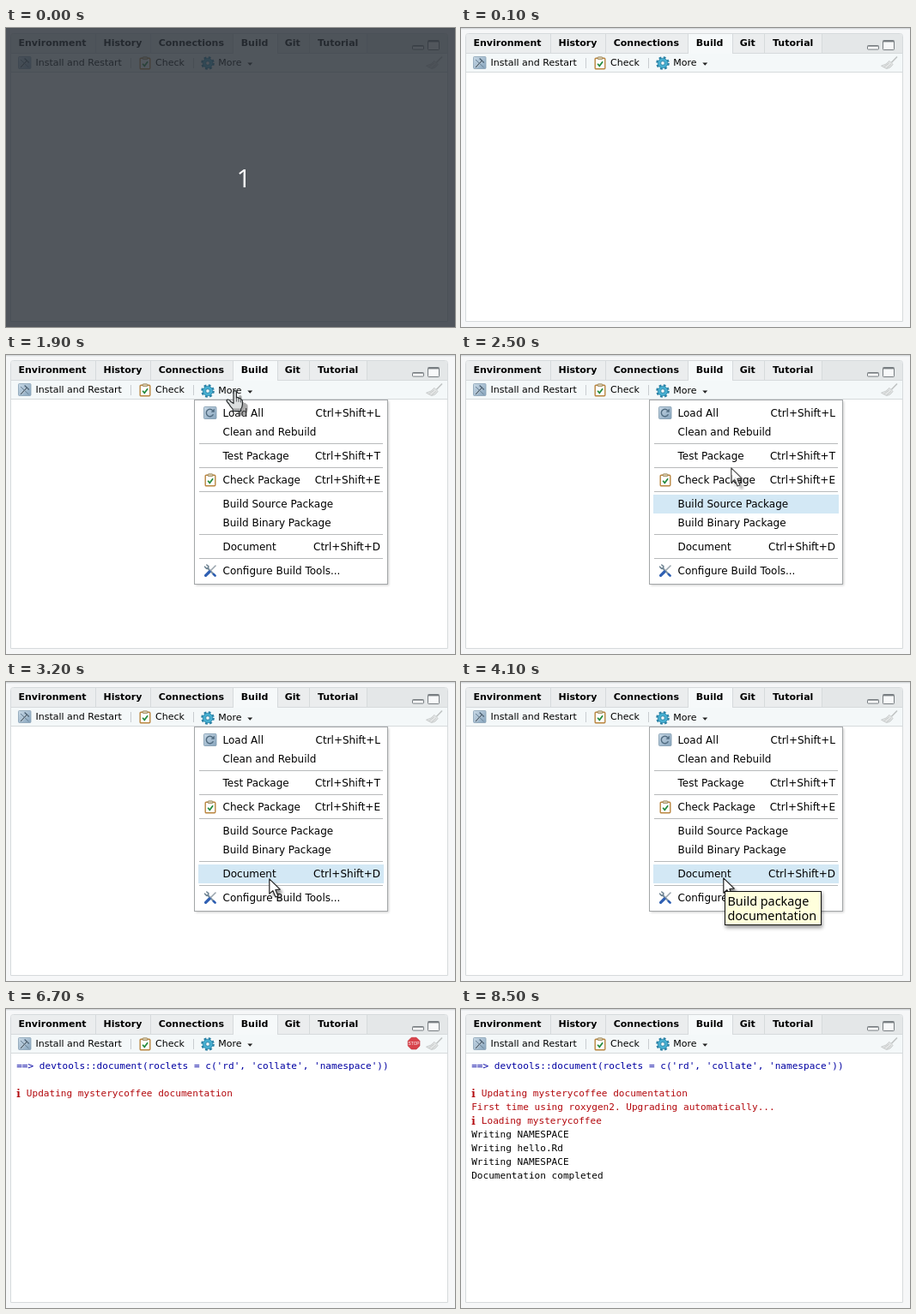
These frames come from a looping animation (523 px wide and 349 px high, 9700 ms). An HTML page:

```html
<!DOCTYPE html>
<html lang="en">
<head>
<meta charset="utf-8">
<title>Build pane</title>
<style>
html, body { margin: 0; width: 100%; height: 100%; overflow: hidden; background: #f6f7f8; }
svg { display: block; width: 523px; height: 349px; }
text { white-space: pre; }
.ui { font: 11px "DejaVu Sans", sans-serif; }
.tab { font: bold 11px "DejaVu Sans", sans-serif; }
.menu { font: 12px "DejaVu Sans", sans-serif; }
.tip { font: 14.4px "Noto Sans", sans-serif; }
.mono { font: 11.08px "DejaVu Sans Mono", monospace; }
.info { font: bold 13px "Noto Serif", serif; }
.count { font: 30px "Open Sans", sans-serif; }
</style>
</head>
<body>
<svg viewBox="0 0 523 349" xmlns="http://www.w3.org/2000/svg">
  <defs>
    <linearGradient id="steel" x2="1" y2="1">
      <stop stop-color="#c9d9e6"/><stop offset="1" stop-color="#86a4bd"/>
    </linearGradient>
    <filter id="soft" x="-50%" y="-50%" width="200%" height="200%"><feGaussianBlur stdDeviation="1.6"/></filter>
    <filter id="wide" x="-20%" y="-30%" width="140%" height="160%"><feGaussianBlur stdDeviation="2.2"/></filter>
    <path id="arrowShape" d="M.8 .8V18.2L4.8 14.6 8 22 11 20.7 7.9 13.5 13.2 13.2Z"/>
    <path id="handShape" d="M9 2.2Q9 .6 10.7 .6T12.4 2.2V9Q13.4 8 14.7 8.8L15 9.8Q16.3 9 17.3 10.2L17.5 11Q19.4 10.8 19.4 13V17Q19.2 20 17.6 22V24.4H8.2V22.2Q5 19 3.6 16L1.2 13.2Q.6 11.2 2.4 11T6 13.6L9 15.6Z"/>
    <g id="clipboard">
      <rect x=".7" y="1.7" width="11.6" height="12.6" rx="1" fill="#fff" stroke="#b9853f" stroke-width="1.4"/>
      <rect x="3.7" y=".3" width="5.6" height="2.8" rx=".8" fill="#d8c9a8" stroke="#8b7647" stroke-width=".7"/>
      <path d="M3.6 8.3L5.8 10.8 9.6 5.8" fill="none" stroke="#238a3c" stroke-width="1.7"/>
    </g>
  </defs>

  <rect width="523" height="349" fill="#f6f7f8"/>
  <rect width="523" height="1" fill="#d5d8da"/>
  <path d="M0 1.5H523" stroke="#eaecee"/>
  <path d="M5.5 342.5V9.5Q5.5 6.5 8.5 6.5H511.5Q514.5 6.5 514.5 9.5V342.5Z" fill="#fff" stroke="#d6dadc"/>
  <path d="M6 29V9.5Q6 7 8.5 7H511.5Q514 7 514 9.5V29Z" fill="#e4e7e8"/>
  <path d="M6 29V9.5Q6 7 8.5 7H420V29Z" fill="#ebedee"/>
  <rect x="6" y="30" width="508" height="21" fill="#f4f8f9"/>
  <path d="M6 29.5H514M6 51.5H514M104.5 7V29M168.5 7V29M264.5 7V29M316.5 7V29M353.5 7V29M420.5 7V29" stroke="#d6dadc"/>
  <rect x="265" y="7" width="51" height="23" fill="#f6f9fa"/>
  <g id="tabs" class="tab"></g>

  <rect x="473.5" y="20.5" width="13" height="4.5" rx=".8" fill="#fff" stroke="#777d81"/>
  <path d="M474 21.2H486" stroke="#777d81"/>
  <rect x="491.5" y="14.5" width="13" height="11" rx=".8" fill="#f8f9fa" stroke="#777d81"/>
  <path d="M492 15.6H504" stroke="#777d81" stroke-width="1.6"/>

  <g transform="translate(14 33)">
    <rect x=".5" y=".5" width="14.5" height="14" rx="1" fill="url(#steel)" stroke="#8aa2b5" stroke-width=".8"/>
    <path d="M3 13L11 4.5" stroke="#f5f7f8" stroke-width="2.2"/>
    <path d="M3 13L11 4.5M7.6 2.6L12.8 7.4" stroke="#4c6274" stroke-width="1.3"/>
    <path d="M3 4L12.5 13" stroke="#667f92" stroke-width="1"/>
  </g>
  <text class="ui" x="34.5" y="44">Install and Restart</text>
  <path d="M145.5 35V47M218.5 35V47" stroke="#c9cdd0"/>
  <use href="#clipboard" x="155.5" y="33.5"/>
  <text class="ui" x="174" y="44">Check</text>
  <g id="more">
    <g transform="translate(235 41)">
      <circle r="6.3" fill="none" stroke="#287fa3" stroke-width="3" stroke-dasharray="2.6 2.348"/>
      <circle r="5.8" fill="#46aed0" stroke="#3189ac" stroke-width=".8"/>
      <circle r="2.3" fill="#f4f8f9" stroke="#287fa3" stroke-width=".8"/>
    </g>
    <text class="ui" x="247.3" y="44">More</text>
    <path d="M281.3 40.5H287.2L284.25 43.7Z" fill="#222"/>
  </g>
  <g id="stop">
    <path d="M472.2 33.3H478L482 37.3V43L478 47H472.2L468.2 43V37.3Z" fill="#d8434b" stroke="#c02f38" stroke-width=".6"/>
    <text x="475.1" y="42.1" text-anchor="middle" textLength="" font-family="Liberation Sans, sans-serif" font-size="4.8" fill="#fff">STOP</text>
  </g>
  <g fill="#e3e5e5" stroke="#bfc3c3" stroke-width=".8">
    <path d="M508 33.5L501.5 40.2" stroke-width="1.6"/>
    <path d="M499 38.4L503 42.4Q500.5 47 495.5 47.4L489.5 44.2Q495.5 43 499 38.4Z"/>
    <path d="M492.5 45.6L498.5 41M495.5 47L501 42.5" fill="none"/>
  </g>

  <g id="log"></g>

  <g id="menu">
    <rect x="221" y="54" width="225" height="215" fill="#000" opacity=".2" filter="url(#soft)"/>
    <rect x="219.5" y="52.5" width="225" height="215" fill="#fff" stroke="#a3a6a8"/>
    <rect id="hover" x="224" width="216" height="22" fill="#d3e8f5"/>
    <path d="M225 103.5H439M225 131.5H439M225 159.5H439M225 209.5H439M225 237.5H439" stroke="#b8babb"/>
    <g transform="translate(230 60)">
      <rect x=".5" y=".5" width="14.5" height="14" rx="1" fill="url(#steel)" stroke="#7d98ad" stroke-width=".8"/>
      <path d="M11.4 9.2A4.2 4.2 0 1 1 10.7 4.8" fill="none" stroke="#526d82" stroke-width="1.5"/>
      <path d="M12.8 2.6V6.8H8.6Z" fill="#526d82"/>
    </g>
    <use href="#clipboard" x="231.5" y="138.5"/>
    <g transform="translate(230 244)" fill="none" stroke-linecap="round">
      <path d="M5 5L13 13" stroke="#8195a3" stroke-width="2.2"/>
      <path d="M1.6 3.2L3.6 5.4 5.6 4.8 5.8 2.6 3.8 1" stroke="#6e8392" stroke-width="1.6"/>
      <path d="M14 2L8 8" stroke="#9aa5ad" stroke-width="1.6"/>
      <path d="M7 9L2.6 13.4" stroke="#2e5fb3" stroke-width="3.2"/>
      <path d="M11.8 11.8L13.6 13.6" stroke="#2e5fb3" stroke-width="2.6"/>
    </g>
    <g id="items" class="menu"></g>
  </g>

  <g id="arrow">
    <use href="#arrowShape" x="4" y="4" opacity=".4" filter="url(#soft)"/>
    <use href="#arrowShape" fill="#fff" stroke="#222" stroke-width="1.2" stroke-linejoin="round"/>
  </g>
  <g id="hand">
    <use href="#handShape" x="6.2" y="5.3" fill="#555" opacity=".5"/>
    <use href="#handShape" fill="#dcdfdf" stroke="#272b2d" stroke-width="1.2" stroke-linejoin="round"/>
    <path d="M12.4 9V13.5M15 9.8V13.8M17.5 11V14.4" stroke="#4a4f52" stroke-width=".9"/>
    <path d="M8.4 22.2H17.4" stroke="#666" stroke-width=".8"/>
  </g>

  <g id="tooltip">
    <rect x="308" y="246" width="113" height="41" fill="#000" opacity=".4" filter="url(#wide)"/>
    <rect x="307.5" y="244.5" width="112" height="39" fill="#ffffdc" stroke="#111"/>
    <text class="tip" x="310.5" y="261">Build package</text>
    <text class="tip" x="310.5" y="278">documentation</text>
  </g>

  <g id="intro">
    <rect width="523" height="349" fill="rgb(45,50,58)" opacity=".82"/>
    <text class="count" x="268.5" y="185.5" fill="#fff">1</text>
  </g>
</svg>
<script>
const LOOP = 9700;
const $ = id => document.getElementById(id);

function addText(parent, str, x, y, attrs = {}) {
  const el = document.createElementNS("http://www.w3.org/2000/svg", "text");
  el.textContent = str;
  Object.entries({ x, y, ...attrs }).forEach(([k, v]) => el.setAttribute(k, v));
  return parent.appendChild(el);
}

const tabs = [["Environment", 14.5], ["History", 113.5], ["Connections", 177.7],
  ["Build", 273.7], ["Git", 324.7], ["Tutorial", 363]];
tabs.forEach(([name, x]) => addText($("tabs"), name, x, 21));

const items = [
  [67, "Load All", "L"], [89, "Clean and Rebuild"], [117, "Test Package", "T"],
  [145, "Check Package", "E"], [173, "Build Source Package"], [195, "Build Binary Package"],
  [223, "Document", "D"], [251, "Configure Build Tools..."]
];
items.forEach(([y, name, key]) => {
  addText($("items"), name, 252.5, y + 5);
  if (key) addText($("items"), "Ctrl+Shift+" + key, 436, y + 5, { "text-anchor": "end" });
});

// Console output: time shown, row, colour, text, info mark
const BLUE = "#0000a2", RED = "#b3080d", BLACK = "#000";
const log = [
  [4400, 0, BLUE, "==> devtools::document(roclets = c('rd', 'collate', 'namespace'))"],
  [6700, 2, RED, "Updating mysterycoffee documentation", true],
  [6800, 3, RED, "First time using roxygen2. Upgrading automatically..."],
  [6900, 4, RED, "Loading mysterycoffee", true],
  [6900, 5, BLACK, "Writing NAMESPACE"],
  [6900, 6, BLACK, "Writing hello.Rd"],
  [7000, 7, BLACK, "Writing NAMESPACE"],
  [7000, 8, BLACK, "Documentation completed"]
].map(([at, row, fill, str, info]) => {
  const y = 70 + row * 16;
  const els = [addText($("log"), str, info ? 23.8 : 12.2, y, { class: "mono", fill })];
  if (info) els.push(addText($("log"), "i", 12.2, y + 2 - 1, { class: "info", fill }));
  return { at, els };
});

// Pointer steps: time, shape, x, y, opacity
const pointer = [
  [0], [600, "arrow", 291, 102], [700, "arrow", 287, 88], [800, "arrow", 281, 70],
  [900, "arrow", 277, 58], [1100, "hand", 260, 46], [1200, "hand", 256, 41],
  [2300, "arrow", 285, 66, .8], [2400, "arrow", 302, 97, .8], [2500, "arrow", 314, 131, .8],
  [2600, "arrow", 312, 192, .8], [2700, "arrow", 307, 230], [3200, "arrow", 306, 229],
  [3400, "arrow", 305, 228], [4500, "arrow", 298, 224], [4900, "arrow", 296, 216], [5000],
  [8200, "arrow", 61, 55], [8300, "arrow", 57, 32], [8400, "arrow", 50, 1], [8500]
];
// Highlighted menu row by time
const hover = [[0, -1], [2300, 1], [2400, 3], [2500, 4], [2600, 6]];

const latest = (steps, t) => steps.findLast(s => s[0] <= t);
const show = (el, on) => el.setAttribute("visibility", on ? "visible" : "hidden");

function draw(t) {
  show($("intro"), t < 100);

  const open = t >= 1800 && t < 4300;
  $("menu").style.display = open ? "" : "none";
  $("more").setAttribute("transform", `translate(0 ${open ? 1 : 0})`);
  const row = latest(hover, t)[1];
  $("hover").setAttribute("opacity", row < 0 ? 0 : 1);
  if (row >= 0) $("hover").setAttribute("y", items[row][0] - 10);
  show($("tooltip"), t >= 4100 && t < 4300);

  show($("stop"), t >= 4400 && t < 7000);
  log.forEach(l => l.els.forEach(el => show(el, t >= l.at)));

  const [, shape, x, y, alpha = 1] = latest(pointer, t);
  for (const id of ["arrow", "hand"]) {
    show($(id), id === shape);
    if (id !== shape) continue;
    $(id).setAttribute("transform", `translate(${x} ${y})`);
    $(id).setAttribute("opacity", alpha);
  }
}

const start = performance.now();
function tick() {
  draw((performance.now() - start) % LOOP);
  requestAnimationFrame(tick);
}
tick();
</script>
</body>
</html>
```
